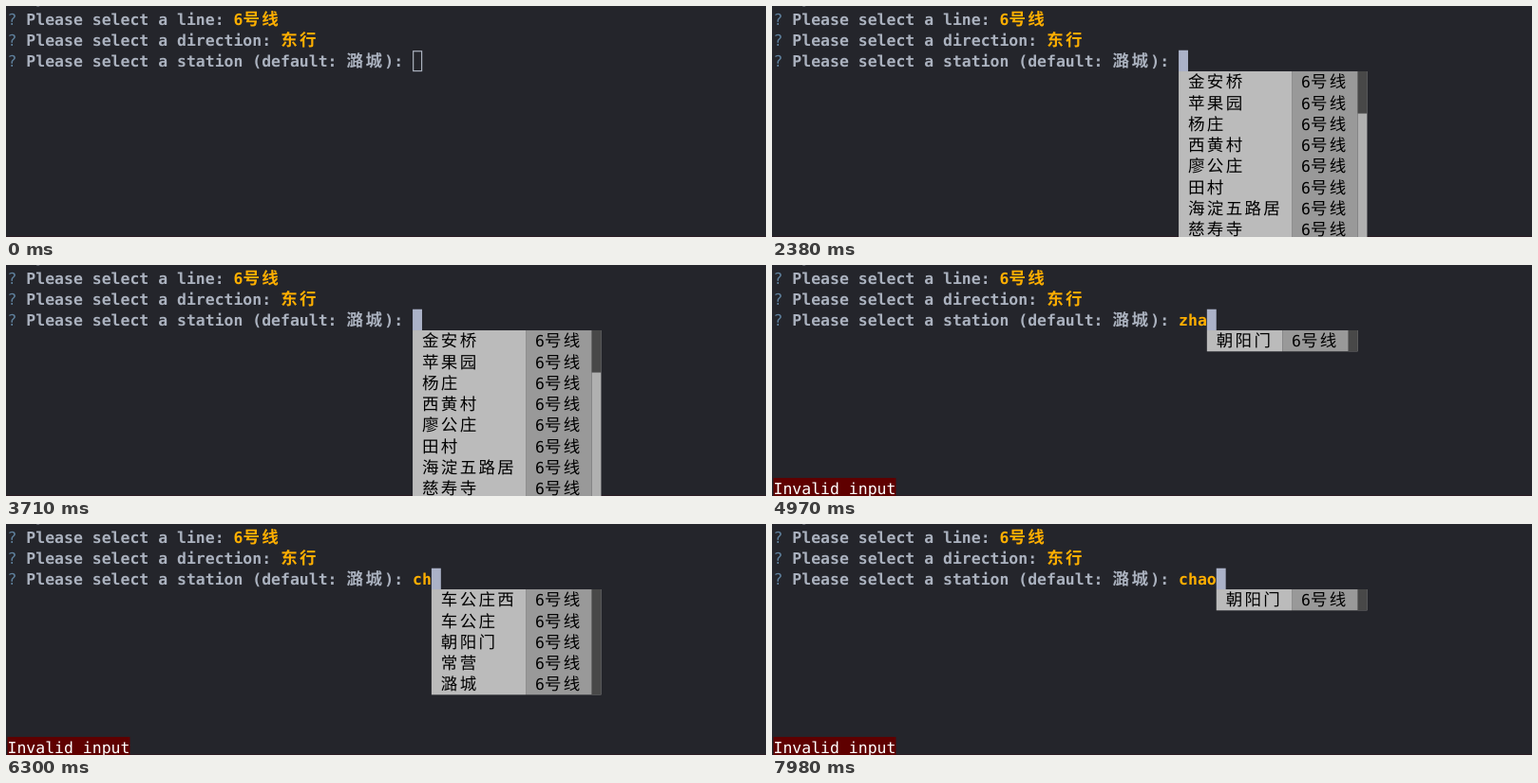
Write an HTML page that moves like this. It is 800 by 244 pixels and loops after 8 s.

```html
<!DOCTYPE html>
<html lang="en">
<head>
<meta charset="utf-8">
<title>Station prompt</title>
<style>
  html, body { margin: 0; width: 100%; height: 100%; overflow: hidden; background: #24252b; }
  svg { display: block; width: 800px; height: 244px; }
  text { white-space: pre; font-family: "DejaVu Sans Mono", monospace; font-size: 16.477px; text-rendering: geometricPrecision; }
  .cjk { font-family: "Noto Sans CJK SC", "Noto Sans CJK", sans-serif; font-size: 17.5px; }
</style>
</head>
<body>
<svg id="stage" viewBox="0 0 800 244"></svg>
<script>
const stage = document.getElementById("stage");
const LOOP = 8000;
const CELL = 9.92, ROW = 22.27, LEFT = 1.5, TOP = 2.2, BASE = 17.4;
const INPUT_COL = 43, INPUT_ROW = 2, LINE = "6号线";
const COLOR = {
  label: "#abb2bf", mark: "#5f819d", answer: "#ffaf00", cursor: "#abb2c8",
  menu: "#bbbbbb", meta: "#999999", track: "#b0b0b0", thumb: "#484848", error: "#5f0000"
};

// Stations with the spellings that match them.
const stations = `金安桥 jinanqiao|苹果园 pingguoyuan|杨庄 yangzhuang|西黄村 xihuangcun|廖公庄 liaogongzhuang
田村 tiancun|海淀五路居 haidianwuluju|慈寿寺 cishousi|花园桥 huayuanqiao|白石桥南 baishiqiaonan
车公庄西 chegongzhuangxi|车公庄 chegongzhuang|平安里 pinganli|北海北 beihaibei|南锣鼓巷 nanluoguxiang
东四 dongsi|朝阳门 chaoyangmen zhaoyangmen|东大桥 dongdaqiao|呼家楼 hujialou|金台路 jintailu
十里堡 shilipu|青年路 qingnianlu|褡裢坡 dalianpo|黄渠 huangqu|常营 changying
草房 caofang|物资学院路 wuzixueyuanlu|通州北关 tongzhoubeiguan|北运河西 beiyunhexi|北运河东 beiyunhedong
郝家府 haojiafu|东夏园 dongxiayuan|潞城 lucheng`.split(/[|\n]/).map(entry => {
  const [name, ...spellings] = entry.split(" ");
  return { name, spellings };
});

// Time, typed text, menu shown.
const edits = [
  [0, "", false], [1890, "", true],
  [4760, "z", true], [4830, "zh", true], [4900, "zha", true], [5110, "zhao", true],
  [5600, "zha", false], [5740, "zh", false], [5880, "z", false], [6020, "", false],
  [6160, "c", true], [6230, "ch", true], [6370, "cha", true], [6510, "chao", true],
  [7280, "chaoy", true], [7420, "chaoya", true],
  [7770, "chaoy", false], [7910, "chao", false], [7980, "chao", true]
];

const px = col => LEFT + col * CELL;
const py = row => TOP + row * ROW;
const cells = str => [...str].reduce((n, ch) => n + (ch > "\x7f" ? 2 : 1), 0);

function box(col, row, w, h, fill) {
  return `<rect x="${px(col)}" y="${py(row)}" width="${w * CELL}" height="${h * ROW}" fill="${fill}"/>`;
}

function print(col, row, str, fill, bold) {
  let out = "";
  for (const run of str.match(/[\x00-\x7f]+|./gu) || []) {
    const kind = run > "\x7f" ? ' class="cjk"' : "";
    out += `<text${kind} x="${px(col)}" y="${py(row) + BASE}" fill="${fill}" font-weight="${bold ? 700 : 400}">${run}</text>`;
    col += cells(run);
  }
  return out;
}

function question(row, label, answer) {
  return print(0, row, "?", COLOR.mark) +
    print(2, row, label, COLOR.label, true) +
    print(3 + cells(label), row, answer, COLOR.answer, true);
}

function menu(col, typed) {
  const found = stations.filter(s => s.spellings.some(p => p.includes(typed)));
  const rows = Math.min(found.length, typed ? 7 : 8);
  const shown = found.slice(0, rows);
  const nameW = Math.max(...shown.map(s => cells(s.name))) + 2;
  const metaW = cells(LINE) + 2;
  const top = INPUT_ROW + 1, metaCol = col + nameW, barCol = metaCol + metaW;
  const thumb = Math.max(1, Math.round(rows * rows / found.length));
  return box(col, top, nameW, rows, COLOR.menu) +
    box(metaCol, top, metaW, rows, COLOR.meta) +
    box(barCol, top, 1, rows, COLOR.track) +
    box(barCol, top, 1, thumb, COLOR.thumb) +
    shown.map((s, i) =>
      print(col + 1, top + i, s.name, "#000") + print(metaCol + 1, top + i, LINE, "#000")).join("");
}

function cursor(col, focused) {
  if (focused) return box(col, INPUT_ROW, 1, 1, COLOR.cursor);
  return `<rect x="${px(col) + .6}" y="${py(INPUT_ROW) + 1}" width="${CELL - 1}" height="${ROW - 1.4}" fill="none" stroke="${COLOR.label}" stroke-width="1.2"/>`;
}

const pointer = `<path d="M465 72V90.5L469.2 86.6L472.2 93.8L475.6 92.3L472.6 85.4H478.2Z" fill="#000" stroke="#fff" stroke-width="1.3" stroke-linejoin="round"/>`;

const backdrop =
  `<rect width="800" height="244" fill="#24252b"/><rect y="243" width="800" height="1" fill="#2b1d25"/>` +
  print(3, -1, "y", COLOR.label, true) +
  question(0, "Please select a line:", LINE) +
  question(1, "Please select a direction:", "东行");

let last = "";

function render(t) {
  const [, typed, open] = edits.findLast(e => e[0] <= t);
  const focused = t >= 1190, mouse = t >= 70 && t < 1400;
  const key = [typed, open, focused, mouse].join();
  if (key === last) return;
  last = key;
  const col = INPUT_COL + typed.length;
  stage.innerHTML = backdrop +
    question(INPUT_ROW, "Please select a station (default: 潞城):", typed) +
    cursor(col, focused) +
    (typed ? box(0, 10, 13, 1, COLOR.error) + print(0, 10, "Invalid input", "#fff") : "") +
    (open ? menu(col, typed) : "") +
    (mouse ? pointer : "");
}

const start = performance.now();
function tick() {
  render((performance.now() - start) % LOOP);
  requestAnimationFrame(tick);
}
tick();
</script>
</body>
</html>
```
